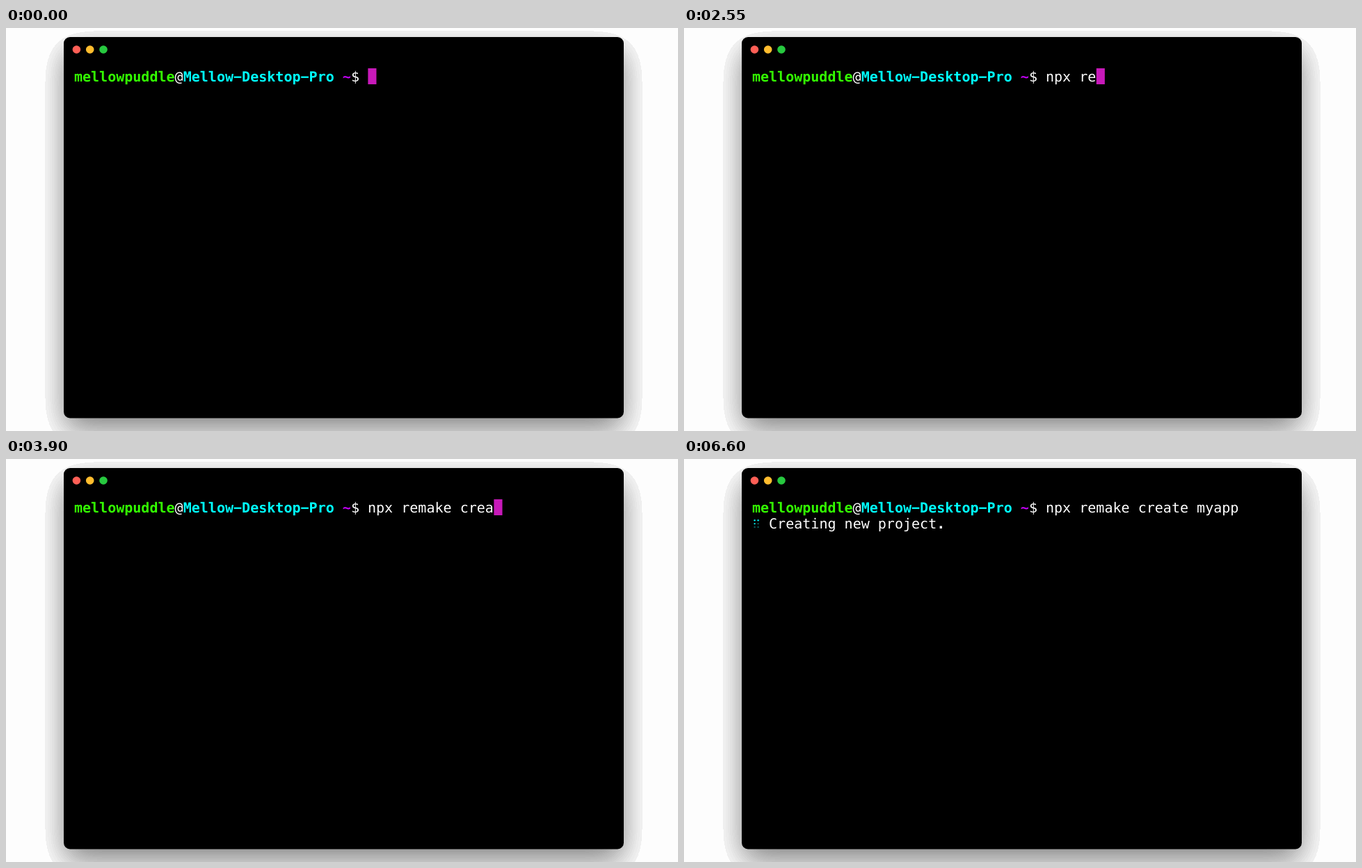
Animation of 966 by 580 pixels, one loop 8000 ms. Source, as an HTML page:

```html
<!DOCTYPE html>
<html lang="en">
<head>
<meta charset="utf-8">
<title>Terminal</title>
<style>
  html, body { margin: 0; width: 100%; height: 100%; overflow: hidden; background: #fdfdfd; }
  svg { display: block; width: 966px; height: 580px; }
  text {
    font: 20.05px "DejaVu Sans Mono", monospace;
    white-space: pre;
    text-rendering: geometricPrecision;
    fill: #fff;
  }
  .bold { font-weight: bold; }
  .user { fill: #33ff00; }
  .host { fill: #00ffff; }
  .path { fill: #c200f5; }
</style>
</head>
<body>
<svg viewBox="0 0 966 580">
  <defs>
    <filter id="shadow" filterUnits="userSpaceOnUse" x="-120" y="-120" width="1206" height="860" color-interpolation-filters="sRGB">
      <feGaussianBlur stdDeviation="23"/>
      <feComponentTransfer><feFuncA id="bands" type="discrete"/></feComponentTransfer>
    </filter>
  </defs>

  <rect x="83" y="31" width="805" height="548" rx="9" filter="url(#shadow)"/>
  <rect x="83" y="13" width="805" height="548.5" rx="9"/>
  <circle cx="101.4" cy="31" r="5.8" fill="#ff5f56"/>
  <circle cx="120.7" cy="31" r="5.8" fill="#ffbd2e"/>
  <circle cx="140" cy="31" r="5.8" fill="#27c93f"/>

  <!-- The minus sign gives the wide dash of the terminal face. -->
  <text x="97.9" y="77"><tspan class="bold user">mellowpuddle</tspan>@<tspan class="bold host">Mellow−Desktop−Pro</tspan> <tspan class="bold path">~</tspan>$ <tspan id="command"></tspan></text>
  <rect id="cursor" width="12.1" height="23" fill="#c719b9"/>

  <g id="output" visibility="hidden">
    <g id="spinner"></g>
    <text x="122.04" y="100">Creating new project<tspan class="bold">.</tspan></text>
  </g>
</svg>

<script>
const LOOP = 8000, ENTER = 5550, REPLY = 6600;
const LEFT = 97.9, CELL = 12.07, PROMPT_LENGTH = 35;
const COMMAND = "npx remake create myapp";
// One time per typed character; equal times appear together.
const KEY_TIMES = [
  1200, 1650, 1800, 2100,
  2400, 2550, 2700, 2850, 3000, 3000, 3150,
  3600, 3750, 3900, 3900, 4050, 4050, 4350,
  4500, 4650, 4950, 5100, 5250
];
const byId = id => document.getElementById(id);
const command = byId("command"), cursor = byId("cursor"), output = byId("output");

// The shadow falls off in flat bands and stops at a hard outer edge.
const BANDS = 27;
byId("bands").setAttribute("tableValues",
  Array.from({ length: BANDS }, (_, i) => i < 3 ? 0 : 0.5 * i / BANDS).join(" "));

const litDots = ["0,0", "1,0", "0,1"];
for (let row = 0; row < 3; row++) {
  for (let col = 0; col < 2; col++) {
    const dot = document.createElementNS("http://www.w3.org/2000/svg", "circle");
    dot.setAttribute("cx", 101.6 + col * 5);
    dot.setAttribute("cy", 88.3 + row * 4.8);
    dot.setAttribute("r", 1.2);
    dot.setAttribute("fill", litDots.includes(`${col},${row}`) ? "#00e6e6" : "#075c5c");
    byId("spinner").append(dot);
  }
}

function draw(time) {
  const typed = KEY_TIMES.filter(t => t <= time).length;
  const entered = time >= ENTER, replied = time >= REPLY;
  command.textContent = COMMAND.slice(0, typed);
  cursor.setAttribute("x", entered ? LEFT : LEFT + (PROMPT_LENGTH + typed) * CELL);
  cursor.setAttribute("y", entered ? 81 : 58);
  cursor.setAttribute("visibility", replied ? "hidden" : "visible");
  output.setAttribute("visibility", replied ? "visible" : "hidden");
}

const start = performance.now();
function tick() {
  draw((performance.now() - start) % LOOP);
  requestAnimationFrame(tick);
}
tick();
</script>
</body>
</html>
```
